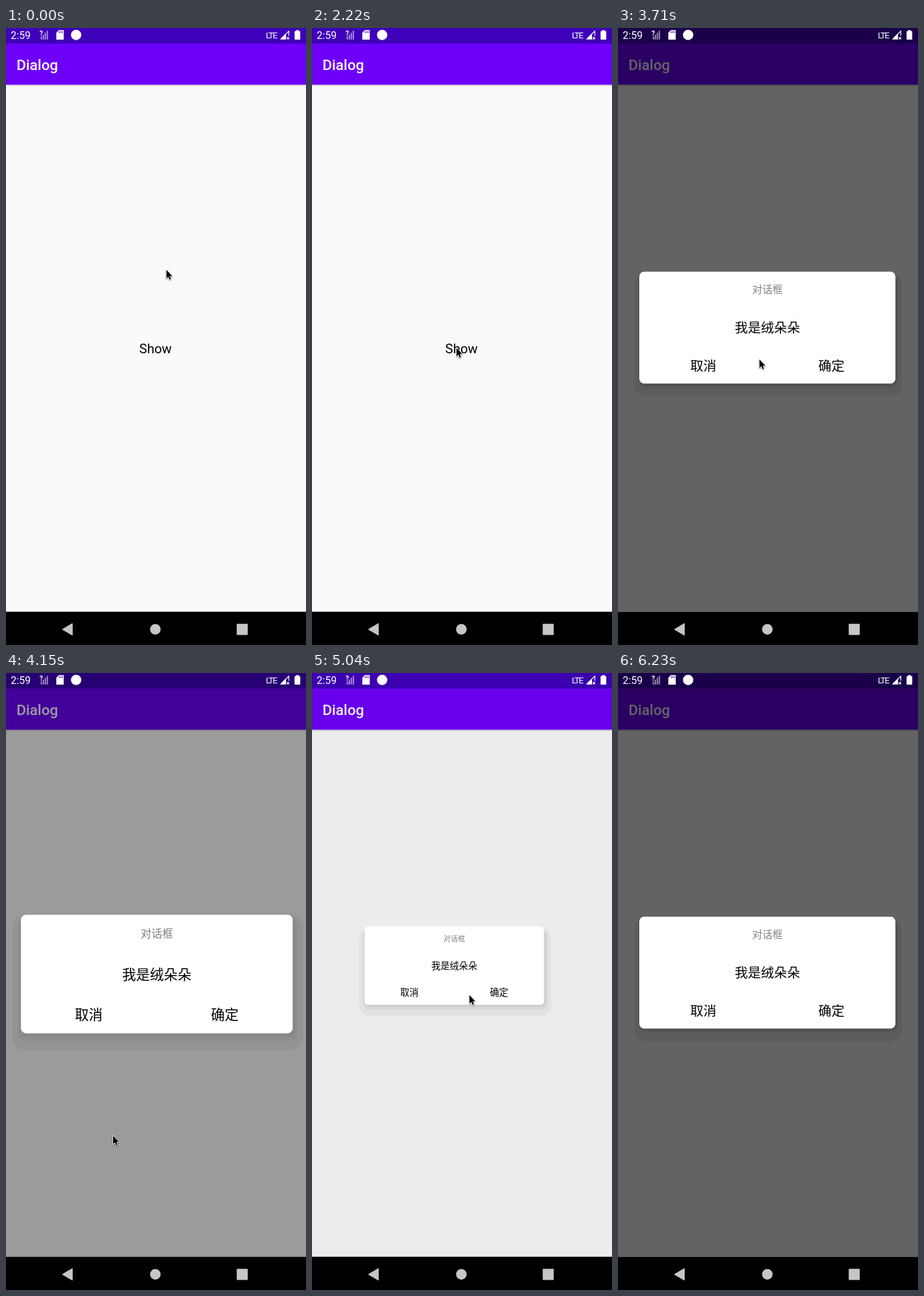
Write an HTML page with a canvas that moves like this. It is 465 px wide and 954 px high and loops after 6.92 s.

```html
<!DOCTYPE html>
<html lang="zh">
<head>
<meta charset="utf-8">
<title>Dialog</title>
<style>
  html, body { margin: 0; width: 100%; height: 100%; overflow: hidden; background: #fafafa; }
  canvas { display: block; width: 465px; height: 954px; }
</style>
</head>
<body>
<canvas id="stage"></canvas>
<script>
const W = 465, H = 954, LOOP = 6920, TICK = 148, NAV_TOP = 902.6;
const canvas = document.getElementById('stage');
const ctx = canvas.getContext('2d');
const ratio = window.devicePixelRatio || 1;
canvas.width = W * ratio;
canvas.height = H * ratio;

const LATIN = 'Roboto, sans-serif';
const CJK = '"Noto Sans CJK SC", "Noto Sans CJK", sans-serif';

const home = { x: 248.7, y: 374 };
const moves = [
  { from: 1050, to: 1480, x: 249.5, y: 390 },
  { from: 1480, to: 1960, x: 224, y: 494.7 },
  { from: 3687, to: 3848, x: 166, y: 715.6 },
  { from: 4292, to: 4440, x: 218.3, y: 596.5 },
  { from: 4440, to: 4588, x: 244, y: 498 },
  { from: 5920, to: 6068, x: 270.3, y: 621.3 }
];
const POINTER_GONE = 6200;

const visits = [{ open: 3183, close: 4067 }, { open: 5013, close: Infinity }];
const FADE = 208, DIM = 0.604, TENSION = 2;

const card = { left: 33, top: 376.8, right: 430, bottom: 549.7 };
const pivot = { x: 195, y: 427 };
const movingShadow = { reach: 14, ratio: 0.45, alpha: 0.045 };
const restShadow = { reach: 8.5, ratio: 0.3, alpha: 0.075 };

const clamp = v => Math.min(1, Math.max(0, v));
const mix = (a, b, k) => a + (b - a) * k;
const anticipate = k => k * k * ((TENSION + 1) * k - TENSION);
const overshoot = k => 1 - anticipate(1 - k);

function pointerAt(t) {
  let { x, y } = home;
  for (const move of moves) {
    const k = clamp((t - move.from) / (move.to - move.from));
    x = mix(x, move.x, k);
    y = mix(y, move.y, k);
  }
  return { x, y };
}

// The card grows from half size with overshoot and leaves with anticipation
function dialogAt(t) {
  const visit = visits.find(v => t >= v.open && t < v.close + FADE);
  if (!visit) return null;
  const rise = clamp((t - visit.open) / FADE);
  const fall = clamp((t - visit.close) / FADE);
  const size = fall > 0 ? 1 - anticipate(fall) : overshoot(rise);
  return {
    scale: mix(0.5, 1, size),
    dim: DIM * (rise - fall),
    shadow: rise < 1 || fall > 0 ? movingShadow : restShadow
  };
}

function box(x, y, w, h, color) {
  ctx.fillStyle = color;
  ctx.fillRect(x, y, w, h);
}

function shape(points, color) {
  ctx.beginPath();
  points.forEach(([x, y]) => ctx.lineTo(x, y));
  ctx.closePath();
  ctx.fillStyle = color;
  ctx.fill();
}

function rounded(x, y, w, h, r, color) {
  ctx.beginPath();
  ctx.roundRect(x, y, w, h, r);
  ctx.fillStyle = color;
  ctx.fill();
}

function disc(x, y, r, color) {
  ctx.beginPath();
  ctx.arc(x, y, r, 0, Math.PI * 2);
  ctx.fillStyle = color;
  ctx.fill();
}

function text(str, x, y, font, color, align = 'left', spacing = 0) {
  ctx.font = font;
  ctx.fillStyle = color;
  ctx.textAlign = align;
  ctx.letterSpacing = spacing + 'px';
  ctx.fillText(str, x, y);
}

function drawApp() {
  box(0, 0, W, H, '#fafafa');
  const fade = ctx.createLinearGradient(0, 87.5, 0, 91);
  fade.addColorStop(0, 'rgba(0,0,0,0.17)');
  fade.addColorStop(1, 'rgba(0,0,0,0)');
  box(0, 87.5, W, 3.5, fade);
  box(0, 24, W, 63.7, '#6e00fa');
  box(0, 0, W, 24, '#3f00ba');
  text('Dialog', 16.2, 65, '500 22.7px ' + LATIN, '#fff');
  text('Show', 231.7, 503.3, '20.4px ' + LATIN, '#000', 'center');
}

function drawStatus() {
  text('2:59', 7.3, 16.8, '16px ' + LATIN, '#fff');

  text('?', 52, 11.8, '700 10.5px ' + LATIN, '#fff');
  for (let i = 0; i < 4; i++) {
    const h = 4.5 + i * 3;
    box(53.7 + i * 3.1, 17.8 - h, 2.2, h, 'rgba(255,255,255,0.5)');
  }

  shape([[82, 3.3], [89.5, 3.3], [89.5, 18], [78, 18], [78, 7.3]], '#fff');
  for (let i = 0; i < 3; i++) box(82 + i * 2.4, 4.8, 1.1, 3, '#3f00ba');

  disc(108.7, 10.7, 8, '#fff');

  text('LTE', 402.7, 15.8, '13.6px ' + LATIN, '#fff', 'left', -1.5);
  shape([[424.8, 17.7], [434, 8.6], [434, 17.7]], '#fff');
  ctx.strokeStyle = '#fff';
  ctx.lineWidth = 1.2;
  ctx.beginPath();
  ctx.moveTo(426, 17);
  ctx.lineTo(438.4, 4.7);
  ctx.lineTo(438.4, 12);
  ctx.moveTo(435.2, 13.9);
  ctx.lineTo(438.8, 17.5);
  ctx.moveTo(438.8, 13.9);
  ctx.lineTo(435.2, 17.5);
  ctx.stroke();

  rounded(447.3, 4.7, 8.8, 13.4, 1, '#fff');
  box(449.7, 3.2, 4, 2, '#fff');
}

function drawNav() {
  box(0, NAV_TOP, W, H - NAV_TOP, '#000');
  const gray = '#c6c6c6';
  ctx.strokeStyle = gray;
  ctx.lineWidth = 1.5;
  ctx.lineJoin = 'round';
  shape([[88, 929.8], [102.7, 921.2], [102.7, 938.4]], gray);
  ctx.stroke();
  disc(231.5, 929.8, 8.2, gray);
  rounded(357.6, 921.3, 17.1, 17.1, 1, gray);
}

function drawShadow(x, y, w, h, scale, { reach, ratio, alpha }) {
  for (let i = 0; i < 3; i++) {
    const shrink = scale * ratio ** i;
    const side = reach * shrink;
    const drop = (reach + 11) * shrink;
    const top = y + 7 - side * 0.55;
    rounded(x - side + 1.3, top, w + side * 2, y + h + drop - top,
            8 + side * 0.9, `rgba(0,0,0,${alpha})`);
  }
}

function drawDialog({ scale, shadow }) {
  const sx = x => mix(pivot.x, x, scale);
  const sy = y => mix(pivot.y, y, scale);
  const x = sx(card.left), y = sy(card.top);
  const w = sx(card.right) - x, h = sy(card.bottom) - y;
  drawShadow(x, y, w, h, scale, shadow);
  rounded(x, y, w, h, 7.5 * scale, '#fff');

  ctx.save();
  ctx.translate(pivot.x, pivot.y);
  ctx.scale(scale, scale);
  ctx.translate(-pivot.x, -pivot.y);
  const large = '20.3px ' + CJK;
  text('对话框', 231.6, 410.2, '15.8px ' + CJK, '#808080', 'center');
  text('我是绒朵朵', 231.6, 471, large, '#000', 'center');
  text('取消', 132.2, 530.2, large, '#000', 'center');
  text('确定', 330.7, 530.2, large, '#000', 'center');
  ctx.restore();
}

function drawPointer({ x, y }) {
  ctx.save();
  ctx.translate(x, y);
  const arrow = [[0, 0], [0, 13], [2.9, 10.4], [5, 15], [7, 14.1], [5, 9.6], [9, 9.4]];
  ctx.shadowColor = 'rgba(0,0,0,0.4)';
  ctx.shadowBlur = 2 * ratio;
  ctx.shadowOffsetY = ratio;
  ctx.strokeStyle = '#fff';
  ctx.lineWidth = 1.6;
  ctx.lineJoin = 'round';
  shape(arrow, '#fff');
  ctx.stroke();
  ctx.shadowColor = 'transparent';
  shape(arrow, '#000');
  ctx.restore();
}

function draw(t) {
  ctx.setTransform(ratio, 0, 0, ratio, 0, 0);
  const dialog = dialogAt(t);
  drawApp();
  if (dialog) box(0, 0, W, NAV_TOP, `rgba(0,0,0,${dialog.dim})`);
  drawStatus();
  drawNav();
  if (dialog) drawDialog(dialog);
  if (t < POINTER_GONE) drawPointer(pointerAt(t));
}

const start = performance.now();
function tick() {
  const t = (performance.now() - start) % LOOP;
  draw(Math.floor(t / TICK) * TICK);
  requestAnimationFrame(tick);
}
tick();
</script>
</body>
</html>
```
